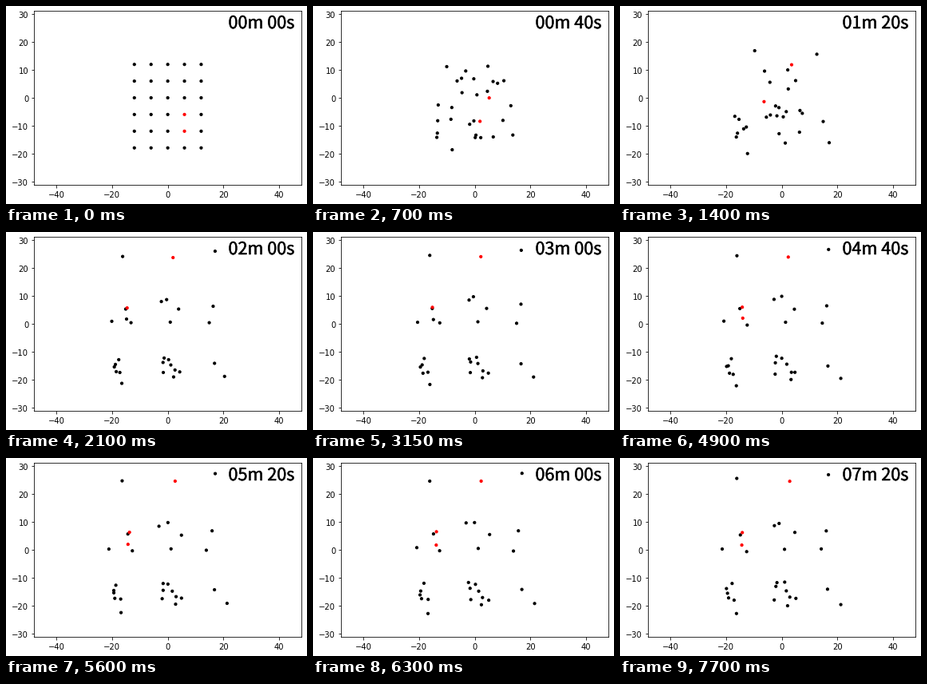
Recreate the animation shown at these times as a matplotlib script. Size 377 px wide and 248 px high, loop 8 s.

```python
import numpy as np
import matplotlib.pyplot as plt
from matplotlib.animation import FuncAnimation
from matplotlib.patheffects import withStroke
from matplotlib.transforms import ScaledTranslation

W, H, DPI = 377, 248, 72
TICK, LOOP, STEP = 50, 8000, 350
STEPS = -(-LOOP // STEP)
LEAVE, ARRIVE = 1, 6      # steps between which the dots travel
PAUSE, CATCH = 13, 12     # step without motion, step of the third red dot
RED, LATE_RED = [18, 23], 29

# The dots start on a grid and walk straight to one key point each
GRID = np.array([(x, y) for y in range(12, -19, -6) for x in range(-12, 13, 6)])
HOME = np.array([
    (-2.3, 8), (.3, -12.9), (-1.7, -13.9), (-.4, 8.7), (4.3, -17.3),
    (16.3, 6.3), (1.1, -14.8), (-16.2, 24.2), (-1.3, -12.3), (-15.1, 5.3),
    (-17.6, -12.9), (-17.2, -17.5), (3.9, 5.3), (17, 26.1), (16.8, -14.2),
    (-18.5, -17.2), (-18.8, -14.6), (-1.6, -17.5), (1.9, 23.8), (2.6, -16.6),
    (-19.2, -15.5), (14.9, .4), (2.1, -19.1), (-14.6, 5.7), (20.4, -18.9),
    (-20.1, .9), (-16.5, -21.4), (.9, .6), (-13.2, .4), (-14.8, 1.7),
])

# Key points lie in a 3 x 3 lattice of rooms; dots slowly spread from the middles
PITCH, MIDDLE = np.array([17, 18]), np.array([0, 3])
ROOM = MIDDLE + PITCH * np.round((HOME - MIDDLE) / PITCH)
SPREAD = 0.25 * (HOME - ROOM)


def make_jitter():
    """Small wandering offsets that begin once the dots have arrived."""
    rng = np.random.default_rng(4)
    walk = np.zeros((STEPS, len(GRID), 2))
    for s in range(ARRIVE + 1, STEPS):
        walk[s] = 0.6 * walk[s - 1] + rng.normal(0, 0.25, GRID.shape)
    return walk


JITTER = make_jitter()


def positions(step):
    if step == PAUSE:
        step -= 1
    if step <= ARRIVE:
        part = max(0, step - LEAVE) / (ARRIVE - LEAVE)
        return GRID + part * (HOME - GRID)
    settle = 1 - np.exp((ARRIVE - step) / 6)
    return HOME + settle * SPREAD + JITTER[step]


def colors(step):
    c = ["black"] * len(GRID)
    for i in RED + [LATE_RED] * (step >= CATCH):
        c[i] = "red"
    return c


plt.rcParams.update({"font.family": "DejaVu Sans", "font.size": 10})
fig = plt.figure(figsize=(W / DPI, H / DPI), dpi=DPI, facecolor="white")
ax = fig.add_axes([35.2 / W, 24.3 / H, 334.8 / W, 217.44 / H])
ax.set(xlim=(-48, 48), ylim=(-31.2, 31.2),
       xticks=range(-40, 41, 20), yticks=range(-30, 31, 10))

# Tick labels sit one pixel low
lower = ScaledTranslation(0, -1 / DPI, fig.dpi_scale_trans)
for label in ax.get_xticklabels() + ax.get_yticklabels():
    label.set_transform(label.get_transform() + lower)

dots = ax.scatter(*GRID.T, s=10, c=colors(0))
clock = ax.text(21.75, 24.95, "", fontsize=21.6, family="Noto Sans CJK JP",
                path_effects=[withStroke(linewidth=0.4, foreground="black")])


def draw(frame):
    step = frame * TICK // STEP
    dots.set_offsets(positions(step))
    dots.set_color(colors(step))
    minutes, seconds = divmod(20 * step, 60)
    clock.set_text(f"{minutes:02d}m {seconds:02d}s")
    return dots, clock


anim = FuncAnimation(fig, draw, frames=LOOP // TICK, interval=TICK,
                     repeat=True, repeat_delay=0)
plt.show()
```
